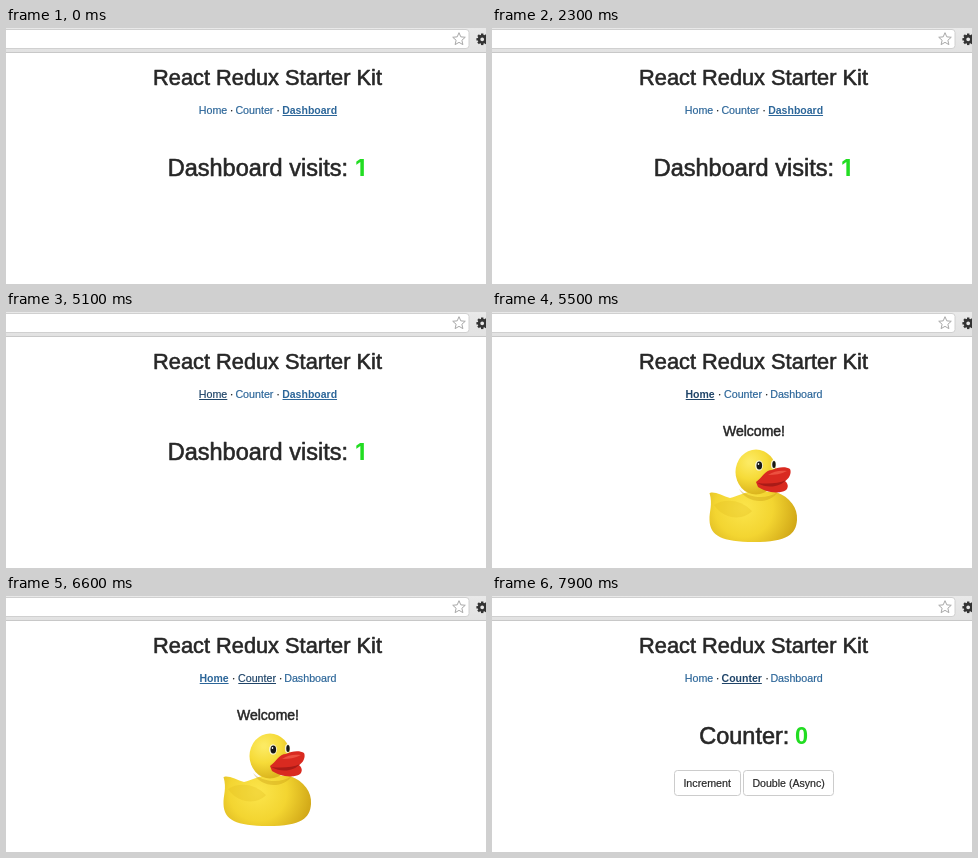
These frames come from a looping animation (480 px wide and 256 px high, 8 s). An HTML page with a canvas:

```html
<!DOCTYPE html>
<html lang="en">
<head>
<meta charset="utf-8">
<title>Starter kit</title>
<style>
html, body { margin: 0; width: 100%; height: 100%; overflow: hidden; background: #fff; }
canvas { display: block; width: 480px; height: 256px; }
</style>
</head>
<body>
<canvas id="stage" width="480" height="256"></canvas>
<script>
const ctx = document.getElementById('stage').getContext('2d');
const LOOP = 8000;
const SANS = '"Liberation Sans", Arial, sans-serif';
const INK = '#272727', LINK = '#2c6699', HOVER = '#1f4468', GREEN = '#22dd22';

// Left edges of the links and centres of the dots, per page
const NAV = {
  dashboard: { links: [192.8, 229.4, 276.2], dots: [225.5, 272] },
  home: { links: [193.4, 232, 278.2], dots: [227.5, 274.5] },
  counter: { links: [192.8, 229.6, 278.4], dots: [225.5, 275] }
};
const LABELS = ['Home', 'Counter', 'Dashboard'];
const PAGES = ['home', 'counter', 'dashboard'];

// Page and hovered link from each moment on
const STEPS = [
  { at: 0, page: 'dashboard', hover: -1 },
  { at: 4400, page: 'dashboard', hover: 0 },
  { at: 5400, page: 'home', hover: 0 },
  { at: 5900, page: 'home', hover: 1 },
  { at: 7300, page: 'counter', hover: 1 }
];

function text(str, x, y, size, { color = INK, weight = 400, align = 'left', stroke = 0, font = SANS } = {}) {
  ctx.font = `${weight} ${size}px ${font}`;
  ctx.textAlign = align;
  ctx.fillStyle = color;
  ctx.fillText(str, x, y);
  if (stroke) {
    ctx.strokeStyle = color;
    ctx.lineWidth = stroke;
    ctx.lineJoin = 'round';
    ctx.strokeText(str, x, y);
  }
  return ctx.measureText(str).width;
}

function rounded(x, y, w, h, r, fill, line) {
  ctx.beginPath();
  ctx.roundRect(x, y, w, h, r);
  ctx.fillStyle = fill;
  ctx.fill();
  ctx.strokeStyle = line;
  ctx.lineWidth = 1;
  ctx.stroke();
}

function shape(path, fill) {
  ctx.fillStyle = fill;
  ctx.fill(new Path2D(path));
}

function oval(x, y, rx, ry, fill) {
  ctx.beginPath();
  ctx.ellipse(x, y, rx, ry, 0, 0, Math.PI * 2);
  ctx.fillStyle = fill;
  ctx.fill();
}

function glow(x, y, r, ...colors) {
  const g = ctx.createRadialGradient(x, y, 2, x, y, r);
  colors.forEach((c, i) => g.addColorStop(i / (colors.length - 1), c));
  return g;
}

function star(x, y, r) {
  ctx.beginPath();
  for (let i = 0; i < 10; i++) {
    const a = -Math.PI / 2 + i * Math.PI / 5;
    const d = i % 2 ? r * 0.46 : r;
    ctx.lineTo(x + d * Math.cos(a), y + d * Math.sin(a));
  }
  ctx.closePath();
  ctx.strokeStyle = '#a8a8a8';
  ctx.lineWidth = 1;
  ctx.lineJoin = 'round';
  ctx.stroke();
}

function gear(x, y) {
  ctx.strokeStyle = '#333';
  ctx.lineWidth = 2.4;
  for (let i = 0; i < 8; i++) {
    const a = i * Math.PI / 4;
    ctx.beginPath();
    ctx.moveTo(x + 3 * Math.cos(a), y + 3 * Math.sin(a));
    ctx.lineTo(x + 5.8 * Math.cos(a), y + 5.8 * Math.sin(a));
    ctx.stroke();
  }
  ctx.lineWidth = 2.6;
  ctx.beginPath();
  ctx.arc(x, y, 3.2, 0, Math.PI * 2);
  ctx.stroke();
}

function toolbar() {
  const g = ctx.createLinearGradient(0, 0, 0, 24);
  g.addColorStop(0, '#e9e9e9');
  g.addColorStop(1, '#e2e2e2');
  ctx.fillStyle = g;
  ctx.fillRect(0, 0, 480, 24);
  ctx.fillStyle = '#c8c8c8';
  ctx.fillRect(0, 24, 480, 1);
  rounded(-10.5, 1.5, 473.5, 19, 3, '#fff', '#d0d0d0');
  star(453, 11.3, 6.6);
  gear(476.2, 11.3);
}

function nav(page, hover) {
  const { links, dots } = NAV[page];
  LABELS.forEach((label, i) => {
    const active = PAGES[i] === page;
    const style = { color: i === hover ? HOVER : LINK, weight: active ? 700 : 400, stroke: active ? 0 : 0.2 };
    const width = text(label, links[i], 86, active ? 10.5 : 10.7, style);
    if (active || i === hover) ctx.fillRect(links[i] + 0.3, 87, width - 0.3, 1);
  });
  dots.forEach(x => text('·', x, 86, 11, { align: 'center', stroke: 0.2 }));
}

function duck() {
  const body = glow(252, 196, 56, '#fbe44a', '#f3d531', '#cfa516');
  const head = glow(258, 150, 32, '#fcea62', '#f6db38', '#dcb61f');
  shape('M218 181 C222 179 231 184 238 186 C246 184 252 180 262 179 L284 180 C298 185 306 196 305 208 C304 222 296 230 262 230 C230 230 218 224 217.5 208 C217 199 221 193 217.5 181 Z', body);
  oval(264, 160, 20.5, 22.5, head);
  shape('M222 193 C232 186 249 187 260 199 C252 208 233 209 222 193 Z', 'rgba(222,184,30,.3)');
  shape('M247 177 C256 186 274 188 286 180 C277 193 255 192 247 177 Z', 'rgba(196,150,16,.35)');

  shape('M264 170 C270 166 273 158 280 158 C285 155 294 154 298 157 C300 161 297 167 293 169 C297 172 297 178 291 179.5 C282 182 272 179 266 175 Z', '#d92a20');
  shape('M265 171 C275 172 286 172 294 168 C288 175 276 177 265 171 Z', '#a91b17');
  shape('M276 163 C281 159 289 158 295 159 C289 162 283 163 276 163 Z', '#ec5140');

  oval(267, 153.5, 4, 5.2, '#f8f3cf');
  oval(267.3, 153.5, 2.8, 4, '#171717');
  oval(281.5, 152.5, 2.6, 4.6, '#f8f3cf');
  oval(282, 152.5, 1.7, 3.6, '#171717');
  oval(266.5, 152, 0.8, 1, '#fff');
}

const CONTENT = {
  dashboard() {
    text('Dashboard visits:', 161.7, 148, 23.5, { stroke: 0.6 });
    text('1', 359.4, 148, 23.5, { color: GREEN, weight: 700, align: 'right', font: 'Inter, sans-serif' });
  },
  home() {
    text('Welcome!', 262, 124, 14, { align: 'center', stroke: 0.5 });
    duck();
  },
  counter() {
    text('Counter:', 207.2, 148, 23.5, { stroke: 0.6 });
    text('0', 303, 148, 23.5, { color: GREEN, weight: 700 });
    rounded(182.5, 174.5, 66, 25, 3, '#fff', '#ccc');
    rounded(251.5, 174.5, 90, 25, 3, '#fff', '#ccc');
    text('Increment', 191.4, 191, 10.7, { stroke: 0.2 });
    text('Double (Async)', 260.4, 191, 10.6, { stroke: 0.2 });
  }
};

function draw(now) {
  const t = now % LOOP;
  const { page, hover } = STEPS.filter(s => s.at <= t).pop();
  ctx.fillStyle = '#fff';
  ctx.fillRect(0, 0, 480, 256);
  toolbar();
  text('React Redux Starter Kit', 261.5, 57, 21.8, { align: 'center', stroke: 0.6 });
  nav(page, hover);
  CONTENT[page]();
  requestAnimationFrame(draw);
}
requestAnimationFrame(draw);
</script>
</body>
</html>
```
